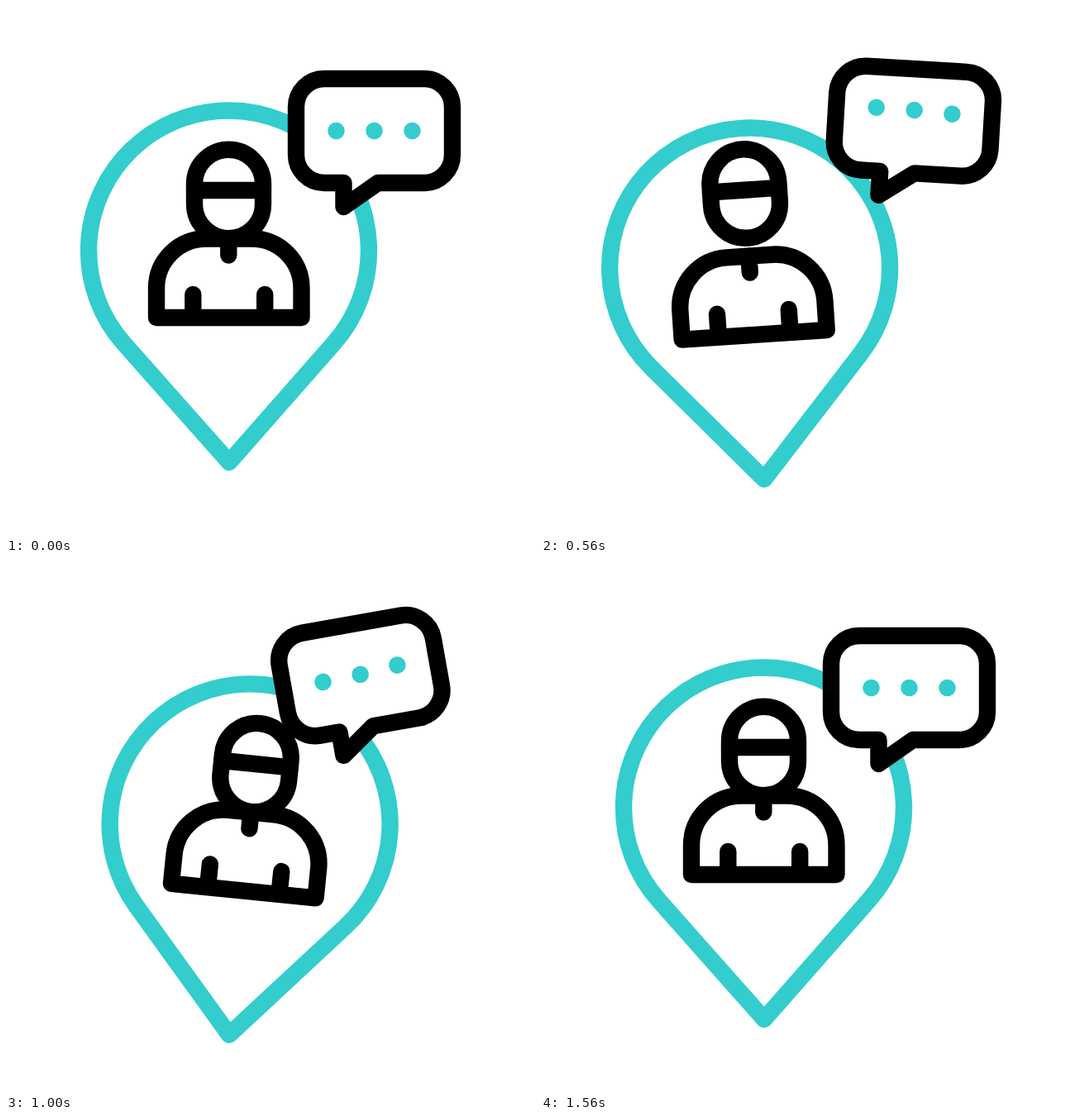
Recreate the animation shown at these times as an HTML page. Size 640 px wide and 640 px high, loop 1920 ms.

```html
<!DOCTYPE html>
<html>
<head>
<meta charset="utf-8">
<style>
  html, body { margin: 0; height: 100%; overflow: hidden; background: #fff; }
  svg { display: block; width: 100%; height: 100%; }
  .line { fill: none; stroke: #000; stroke-width: 20.4; stroke-linecap: round; stroke-linejoin: round; }
  .teal { stroke: #33cdcd; }
  .solid { fill: #fff; }
</style>
</head>
<body>
<svg viewBox="0 0 640 640">
  <g id="pin" class="line">
    <path class="teal" d="M270 552L142.6 408.3A169.5 169.5 0 1 1 396.4 408.3Z"/>
    <path d="M182 377V341.5A60 60 0 0 1 242 281.5H297.5A60 60 0 0 1 357.5 341.5V377ZM269.3 281.5V301.5M226.3 349V377M313.2 349V377"/>
    <g id="head">
      <rect x="228" y="173.7" width="83" height="107.5" rx="41.5"/>
      <path d="M228 223H311"/>
    </g>
  </g>
  <g id="bubble">
    <path class="line solid" d="M385 88H506A34 34 0 0 1 540 122V180A34 34 0 0 1 506 214H450L408.5 243V214H385A34 34 0 0 1 351 180V122A34 34 0 0 1 385 88Z"/>
    <g fill="#33cdcd">
      <circle class="dot" cx="399.5" cy="151" r="10.3"/>
      <circle class="dot" cx="445.5" cy="151" r="10.3"/>
      <circle class="dot" cx="491.5" cy="151" r="10.3"/>
    </g>
  </g>
</svg>
<script>
const LOOP = 1920, MOVE = 1560, STEP = 40;
const pin = document.getElementById('pin');
const head = document.getElementById('head');
const bubble = document.getElementById('bubble');
const dots = document.querySelectorAll('.dot');

// cubic-bezier(.6, 0, .4, 1), solved by bisection
function ease(x) {
  let lo = 0, hi = 1;
  for (let i = 0; i < 24; i++) {
    const u = (lo + hi) / 2;
    if (u * (1.8 - u * (2.4 - 1.6 * u)) < x) lo = u; else hi = u;
  }
  return lo * lo * (3 - 2 * lo);
}

// Value at time t along eased [time, value] keys
function track(t, ...keys) {
  if (t <= keys[0][0]) return keys[0][1];
  for (let i = 1; i < keys.length; i++) {
    const [t0, a] = keys[i - 1], [t1, b] = keys[i];
    if (t < t1) return a + (b - a) * ease((t - t0) / (t1 - t0));
  }
  return keys[keys.length - 1][1];
}

const bump = (t, start, peak, end, size) => track(t, [start, 0], [peak, size], [end, 0]);

function pose(el, dy, angle = 0, x = 0, y = 0) {
  el.setAttribute('transform', `translate(0 ${dy}) rotate(${angle} ${x} ${y})`);
}

function draw(t) {
  pose(pin, bump(t, 0, 750, 1510, 22.3),
    track(t, [0, 0], [455, -4.25], [985, 5.75], [MOVE, 0]), 270, 552);
  pose(head, bump(t, 0, 528, 1045, -21.7));
  pose(bubble, bump(t, 90, 705, 1380, -15.2),
    track(t, [90, 0], [468, 4.25], [890, -10.7], [1390, 0]), 408.5, 243);
  dots.forEach((dot, i) => {
    const start = 90 + 78 * i;
    pose(dot, bump(t, start, start + 480, start + 960, -13.8));
  });
}

function tick(now) {
  draw(Math.min(Math.floor(now % LOOP / STEP) * STEP, MOVE));
  requestAnimationFrame(tick);
}
tick(performance.now());
</script>
</body>
</html>
```
